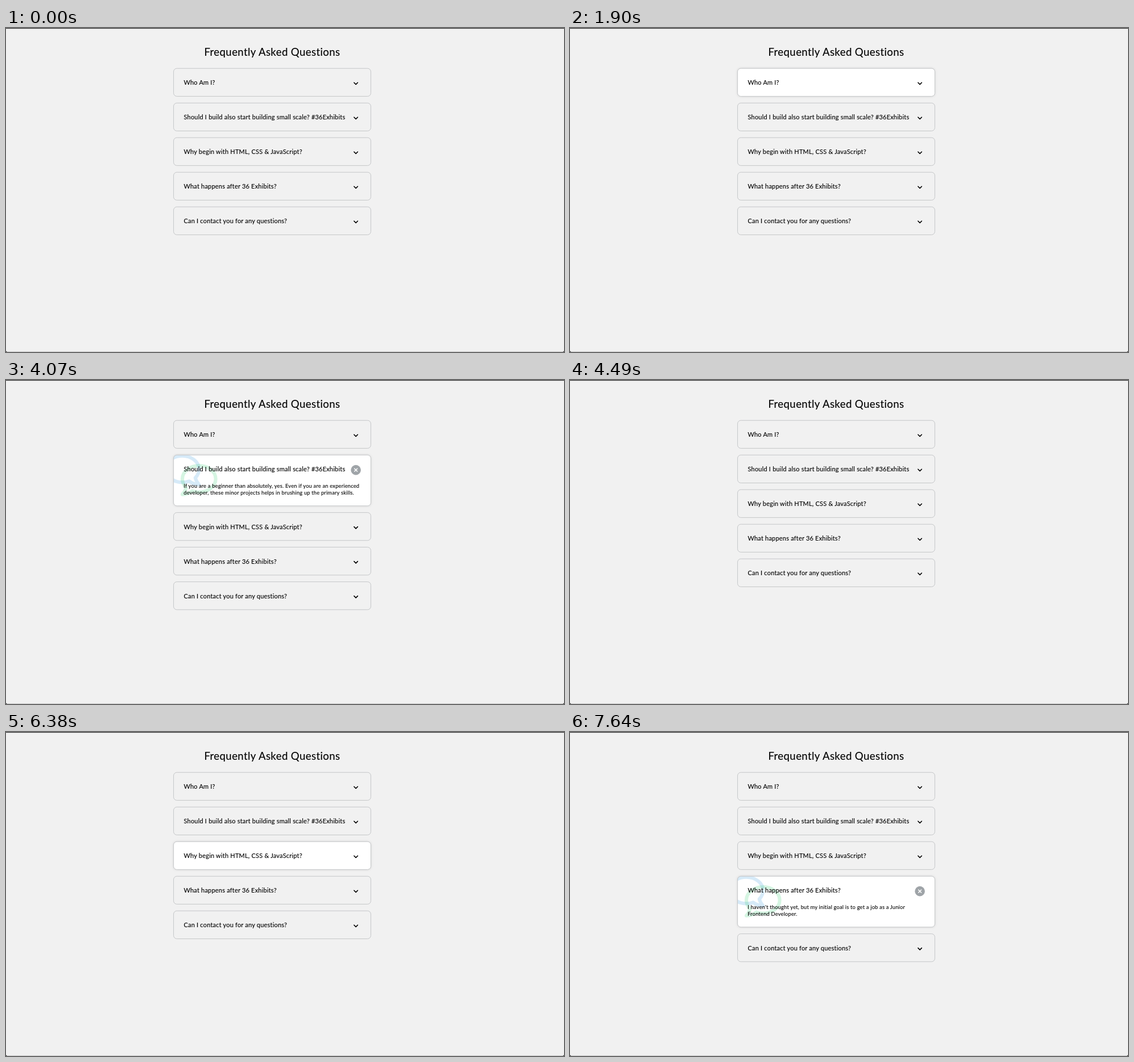
An HTML page that plays this animation: 981 by 571 pixels, repeating every 8 s.

```html
<!DOCTYPE html>
<html lang="en">
<head>
<meta charset="utf-8">
<title>FAQ</title>
<style>
  html, body { margin: 0; width: 100%; height: 100%; overflow: hidden; background: #f1f1f1; }
  svg { display: block; width: 981px; height: 571px; }
  text { font-family: Lato, "Open Sans", sans-serif; fill: #000; stroke: #000; }
  .title { font-size: 18.6px; letter-spacing: .4px; stroke-width: .12px; text-anchor: middle; }
  .question { font-size: 11px; letter-spacing: .2px; stroke-width: .12px; }
  .answer { font-size: 9.3px; letter-spacing: .2px; stroke-width: .08px; }
  .lit { fill: #fff; filter: drop-shadow(0 .6px 2px rgba(0, 0, 0, .14)); }
  .border { fill: none; stroke: #c4c6c8; }
  .icon { fill: none; stroke-width: 1.6; stroke-linecap: round; stroke-linejoin: round; }
  .bubble { fill: none; stroke-width: 48; stroke-linejoin: round; opacity: .2; }
</style>
</head>
<body>
<svg viewBox="0 0 981 571">
  <defs>
    <clipPath id="card"><rect width="346.8" height="88" rx="5.8"/></clipPath>
    <path id="bubble" d="M76 362C42 328 24 285 24 240a232 184 0 1 1 232 184c-33 0-64-6-94-16-32 24-80 48-138 48 22-24 42-58 52-94z"/>
  </defs>
  <rect width="981" height="1.2" fill="#333"/>
  <rect y="570" width="981" height="1" fill="#c4c4c4"/>
  <path d="M0 569v2h2zM981 569v2h-2z" fill="#333"/>
  <text class="title" x="468" y="49">Frequently Asked Questions</text>
  <g id="list"></g>
</svg>
<script>
const LOOP = 8000, LEFT = 294.6, TOP = 71.2, HEIGHT = 49.2, PITCH = 61, LINE = 11.55;

// open: when the answer shows; fade: start and end of lighting up, then of dimming
const items = [
  { question: "Who Am I?", open: [500, 1900], fade: [500, 780, 2039, 2040], answer: [
    "I'm Javier, an aspiring Frontend Developer. I'm currently looking for a full",
    "time job. I have recently finished a Full Stack Web Development",
    "Bootcamp in Berlin at Morvel College."] },
  { question: "Should I build also start building small scale? #36Exhibits",
    open: [2740, 4350], fade: [2740, 3090, 4350, 4490], answer: [
    "If you are a beginner than absolutely, yes. Even if you are an experienced",
    "developer, these minor projects helps in brushing up the primary skills."] },
  { question: "Why begin with HTML, CSS &amp; JavaScript?",
    open: [5050, 6380], fade: [5050, 5330, 6450, 6590], answer: [
    "These three are the building blocks of every page on the web. Once the",
    "basics are clear, it is much easier to pick up any framework later on.",
    "Working without extra tools also helps in understanding how things",
    "really work in the browser."] },
  { question: "What happens after 36 Exhibits?",
    open: [7360, LOOP], fade: [7360, 7640, LOOP, LOOP + 1], answer: [
    "I haven't thought yet, but my initial goal is to get a job as a Junior",
    "Frontend Developer."] },
  { question: "Can I contact you for any questions?", open: [LOOP, LOOP], fade: [LOOP, LOOP + 1, LOOP, LOOP + 1], answer: [] }
];

const box = name => `<rect class="${name}" width="346.8" height="${HEIGHT}" rx="5.8"/>`;

const markup = item => `<g>
  ${box("lit")}
  <g class="opened">
    <g clip-path="url(#card)">
      <use href="#bubble" class="bubble" stroke="#3498db" transform="translate(47.8 -5.5) scale(-.1264 .1264)"/>
      <use href="#bubble" class="bubble" stroke="#2ecc71" transform="translate(12.4 11.8) scale(.1264)"/>
    </g>
    ${item.answer.map((line, i) => `<text class="answer" x="17.7" y="${58 + i * LINE}">${line}</text>`).join("")}
    <circle cx="320.5" cy="26.4" r="8.8" fill="#9fa4a8"/>
    <path class="icon" stroke="#fff" d="M318.1 24l4.8 4.8m0-4.8l-4.8 4.8"/>
  </g>
  <path class="icon closed" stroke="#000" d="M317.3 25l3.2 3.2 3.2-3.2"/>
  ${box("border")}
  <text class="question" x="17.9" y="29">${item.question}</text>
</g>`;

const list = document.getElementById("list");
list.innerHTML = items.map(markup).join("");
items.forEach((item, i) => {
  const node = list.children[i];
  const find = name => node.querySelector("." + name);
  Object.assign(item, { node, lit: find("lit"), border: find("border"), opened: find("opened"), closed: find("closed") });
});

const ramp = (t, from, to) => {
  const p = Math.min(1, Math.max(0, (t - from) / (to - from)));
  return p * p * (3 - 2 * p);
};
const show = (node, on) => node.setAttribute("visibility", on ? "visible" : "hidden");

function draw(now) {
  const t = now % LOOP;
  let y = TOP;
  for (const item of items) {
    const isOpen = t >= item.open[0] && t < item.open[1];
    const extra = isOpen ? LINE * (item.answer.length + 1.5) : 0;
    const [a, b, c, d] = item.fade;
    item.node.setAttribute("transform", `translate(${LEFT} ${y})`);
    item.lit.setAttribute("height", HEIGHT + extra);
    item.border.setAttribute("height", HEIGHT + extra);
    item.lit.setAttribute("opacity", ramp(t, a, b) - ramp(t, c, d));
    show(item.opened, isOpen);
    show(item.closed, !isOpen);
    y += PITCH + extra;
  }
}

const start = performance.now();
function tick() {
  draw(performance.now() - start);
  requestAnimationFrame(tick);
}
tick();
</script>
</body>
</html>
```
